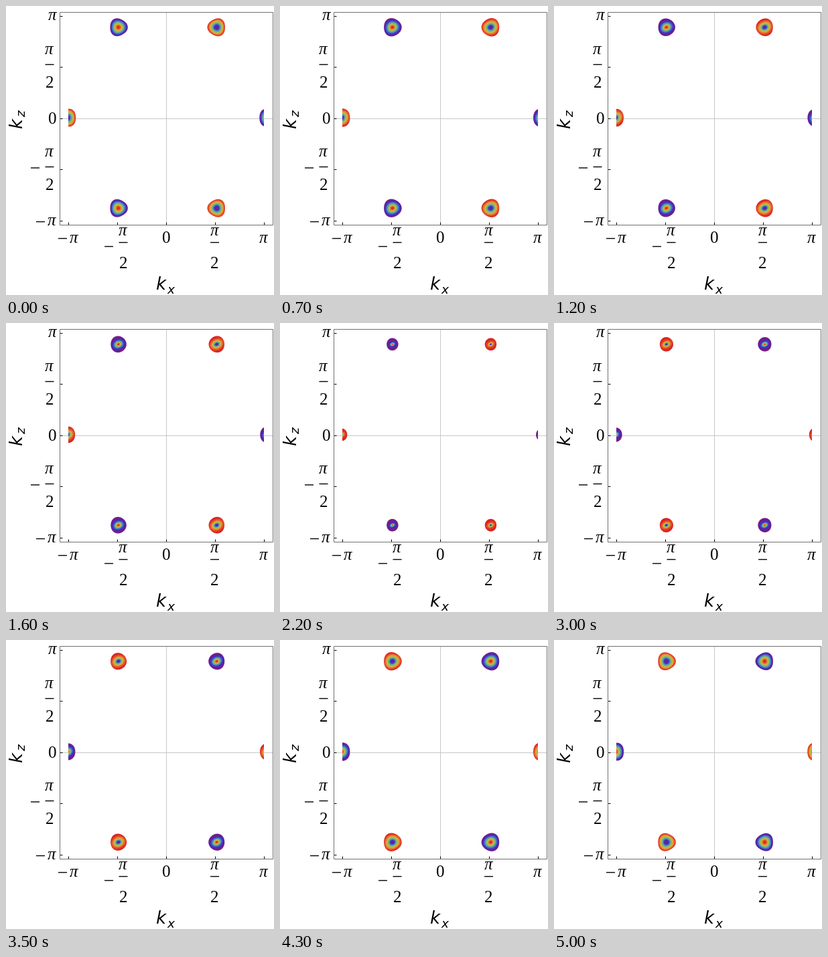
Animation, 400 px wide and 432 px high, one loop 5100 ms. Source, as a matplotlib script:

```python
import numpy as np
import matplotlib.pyplot as plt
from matplotlib.animation import FuncAnimation
from matplotlib.colors import LinearSegmentedColormap

W, H, DPI = 400, 432, 100
FRAMES, STEP = 51, 100
MID = FRAMES // 2
PX = 72 / DPI  # points per pixel

RAINBOW = LinearSegmentedColormap.from_list("rainbow", [
    (0.47, 0.11, 0.53), (0.28, 0.16, 0.72), (0.25, 0.36, 0.80),
    (0.31, 0.59, 0.74), (0.43, 0.69, 0.53), (0.60, 0.74, 0.35),
    (0.79, 0.72, 0.25), (0.90, 0.59, 0.21), (0.90, 0.36, 0.17),
    (0.86, 0.13, 0.13)])

X_TICKS = (93, 166, 239, 312, 385)
Y_TICKS = (15, 91, 168, 244, 321)
LEFT, RIGHT, TOP, BOTTOM = 80, 398, 9, 327

fig = plt.figure(figsize=(W / DPI, H / DPI), dpi=DPI, facecolor="white")
ax = fig.add_axes([0, 0, 1, 1])


def line(x0, y0, x1, y1, color="black", width=1.0):
    """Line through pixel centres."""
    ax.plot([x0 + .5, x1 + .5], [y0 + .5, y1 + .5], color=color,
            lw=width * PX, solid_capstyle="butt", snap=False, zorder=1)


def label(x, y, text, size=25, family="Liberation Serif", **kw):
    kw = {"ha": "center", "va": "baseline", **kw}
    ax.text(x, y, text, fontsize=size * PX, family=family, **kw)


def pi(x, y):
    label(x, y, "π", style="italic")


def bar(x, y):
    line(x - 6.5, y, x + 6.5, y, width=1.4)


def half_pi(x, y, above, below):
    """Stacked fraction whose bar is centred at x, y."""
    pi(x, y - above)
    bar(x, y)
    label(x + .5, y + below, "2")


def draw_axes():
    line(239, TOP, 239, BOTTOM, "#c8c8c8")
    line(LEFT, 168, RIGHT, 168, "#c8c8c8")
    for x in X_TICKS:
        line(x, BOTTOM - 4, x, BOTTOM)
    for y in Y_TICKS:
        line(LEFT, y, LEFT + 4, y)
    for y in (TOP, BOTTOM):
        line(LEFT, y, RIGHT, y, "#707070")
    for x in (LEFT, RIGHT):
        line(x, TOP, x, BOTTOM, "#707070")

    pi(69, 21)
    half_pi(64.5, 87, 15, 35)
    label(69, 175.5, "0")
    half_pi(64.5, 240, 15, 35)
    bar(43, 241.5)
    pi(68.5, 327.5)
    bar(51, 322)

    pi(101, 353.5)
    bar(84, 347)
    half_pi(174.5, 353, 10, 39)
    bar(153, 359)
    label(239, 354.5, "0")
    half_pi(311, 353, 10, 39)
    pi(384.5, 353.5)

    sans = dict(family="DejaVu Sans", style="italic", ha="left")
    up = dict(rotation=90, rotation_mode="anchor", **sans)
    label(223, 424, "k", 26, **sans)
    label(240, 429.5, "x", 18.5, **sans)
    label(24, 183, "k", 26, **up)
    label(29.5, 166, "z", 18.5, **up)


# centre x, centre y, sign of the charge
POCKETS = [(167.3, 31.3, 1), (167.3, 301.7, 1),
           (314.0, 31.3, -1), (314.0, 301.7, -1),
           (91.2, 166.5, -1), (390.2, 166.5, 1)]
GY, GX = np.mgrid[0:H, 0:W].astype(float)


def pocket(img, cx, cy, charge, gap):
    """Paint the region where the curvature of one node exceeds a threshold."""
    s = abs(gap)
    dx, dy = GX - cx, GY - cy
    r, ang = np.hypot(dx, dy), np.arctan2(dy, dx)
    size = 13.2 * np.sqrt(1.7 * s ** .6 - .7 * s * s)
    rim = size * (1 + charge * .06 * s * np.cos(3 * ang)
                  - .04 * (1 - s) * np.cos(2 * ang))
    alpha = np.clip(rim - r + .5, 0, 1)

    # the core is stretched along a slanted axis when the gap is small
    a, b = .92 * dx - .39 * dy, .39 * dx + .92 * dy
    k = .2 * (1 - s)
    core2 = (a * (1 - k)) ** 2 + (b * (1 + k)) ** 2
    m2 = (12.2 * s ** .75) ** 2
    peak = (1 + core2 / m2) ** -1.5
    base = (1 + rim ** 2 / m2) ** -1.5
    value = np.clip((peak - base) / (1 - base), 0, 1)

    hole = 2.8 * (.12 - s) / .08
    if hole > 0:
        alpha *= np.clip(np.sqrt(core2) - hole + .5, 0, 1)
        value = .13 * np.sin(ang) ** 2
    positive = charge * gap < 0
    rgb = RAINBOW(value if positive else 1 - value)[..., :3]
    if hole > 0:
        other = np.array(RAINBOW(1.0 if positive else 0.0)[:3])
        mix = .35 * np.cos(ang)[..., None] ** 2
        rgb = rgb * (1 - mix) + other * mix

    alpha[(GX < 93) | (GX > 384)] = 0
    hit = alpha > 0
    img[hit, :3] = rgb[hit]
    img[hit, 3] = alpha[hit]


draw_axes()
layer = ax.imshow(np.zeros((H, W, 4)), extent=(0, W, H, 0),
                  interpolation="nearest", aspect="auto", zorder=2)
ax.set_xlim(0, W)
ax.set_ylim(H, 0)
ax.axis("off")


def update(i):
    gap = (i - MID) / MID
    # the gap closes here and the page is empty
    ax.set_visible(gap != 0)
    if gap:
        img = np.zeros((H, W, 4))
        for cx, cy, charge in POCKETS:
            pocket(img, cx, cy, charge, gap)
        layer.set_data(img)
    return [layer]


anim = FuncAnimation(fig, update, frames=FRAMES, interval=STEP,
                     repeat=True, repeat_delay=0, blit=False)
plt.show()
```
